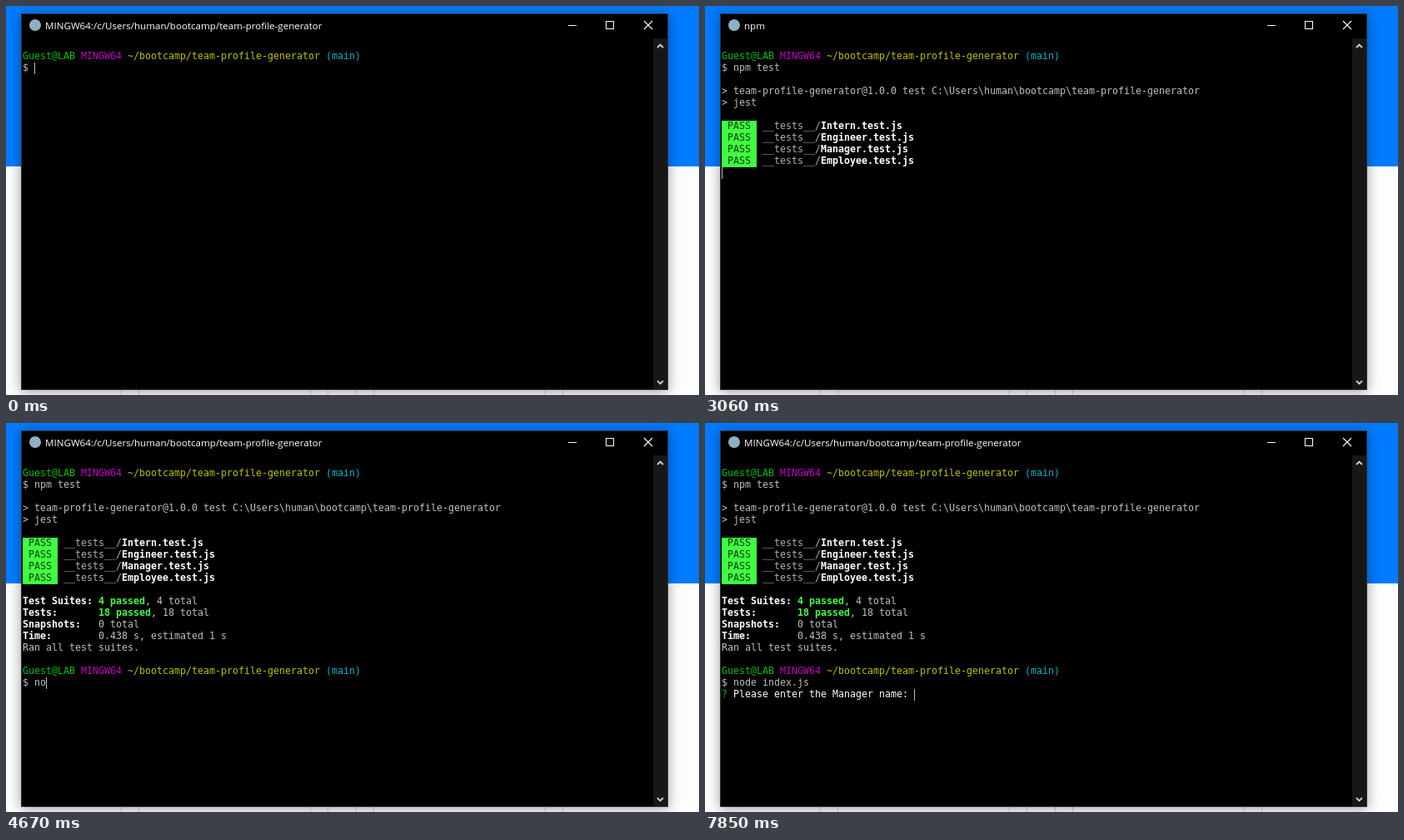
These frames come from a looping animation (832 px wide and 468 px high, 8000 ms). An HTML page with a canvas:

```html
<!DOCTYPE html>
<html lang="en">
<head>
<meta charset="utf-8">
<title>Terminal</title>
<style>
html, body { margin: 0; width: 100%; height: 100%; overflow: hidden; background: #fdfdfd; }
canvas { display: block; }
</style>
</head>
<body>
<canvas id="stage" width="832" height="468"></canvas>
<script>
const ctx = document.getElementById('stage').getContext('2d');
const LOOP = 8000;
const CELL = { w: 7, h: 14, left: 20, top: 40, baseline: 10 };
const MONO = '11.63px "DejaVu Sans Mono", monospace';
const C = {
  text: '#bfbfbf', white: '#ffffff', green: '#00bf00', magenta: '#bf00bf',
  yellow: '#bfbf00', cyan: '#00b4cc', lime: '#40ff40', amber: '#ffff40', dim: '#b0b0b0'
};
const PROJECT = 'team-profile-generator';
const SHELL_TITLE = `MINGW64:/c/Users/human/bootcamp/${PROJECT}`;

const seg = (text, color = C.text, bold = false, fill = null) => ({ text, color, bold, fill });

const prompt = [
  seg('Guest@LAB ', C.green), seg('MINGW64 ', C.magenta),
  seg(`~/bootcamp/${PROJECT} `, C.yellow), seg('(main)', C.cyan)
];
const testLine = (label, name, fill) => [
  seg(` ${label} `, '#123c12', false, fill), seg(' __tests__/', C.dim), seg(`${name}.test.js`, C.white, true)
];
const summary = (label, passed, rest) => [
  seg(label.padEnd(13), C.white, true), seg(passed, C.lime, true), seg(rest)
];

// Each entry: first visible time, row, segments, optional end time.
const lines = [
  [0, 1, prompt],
  [0, 2, [seg('$')]],
  [2200, 4, [seg(`> ${PROJECT}@1.0.0 test C:\\Users\\human\\bootcamp\\${PROJECT}`)]],
  [2200, 5, [seg('> jest')]],
  [2820, 8, testLine('RUNS', 'Intern', C.amber), 3060],
  ...['Intern', 'Engineer', 'Manager', 'Employee'].map(
    (name, i) => [3060, 7 + i, testLine('PASS', name, C.lime)]),
  [3180, 12, summary('Test Suites:', '4 passed', ', 4 total')],
  [3180, 13, summary('Tests:', '18 passed', ', 18 total')],
  [3180, 14, summary('Snapshots:', '', '0 total')],
  [3180, 15, summary('Time:', '', '0.438 s, estimated 1 s')],
  [3180, 16, [seg('Ran all test suites.')]],
  [3550, 18, prompt],
  [3550, 19, [seg('$')]],
  [6740, 20, [seg('? ', C.green), seg('Please enter the Manager name:', C.white)]]
];

const typed = [
  { row: 2, keys: [[500, 'n'], [620, 'p'], [860, 'm'], [980, ' '], [1100, 'te'], [1220, 's'], [1340, 't']] },
  { row: 19, keys: [[4670, 'no'], [4920, 'd'], [5160, 'e'], [5280, ' '], [5520, 'i'], [5640, 'nd'],
    [5760, 'e'], [6000, 'x'], [6120, '.j'], [6240, 's']] }
];

// Time, row, column; a lone time hides the cursor.
const cursorMoves = [
  [0, 2, 2], [250], [1580, 3, 0], [2200, 7, 0], [2700], [2820, 9, 0], [3060, 11, 0],
  [3180, 17, 0], [3550, 19, 2], [4050], [6490, 20, 0], [6740, 20, 33], [7230], [7850, 20, 33]
];
for (const { row, keys } of typed) {
  let col = 2;
  for (const [time, text] of keys) cursorMoves.push([time, row, col += text.length]);
}
cursorMoves.sort((a, b) => a[0] - b[0]);

function rect(x, y, w, h, color) {
  ctx.fillStyle = color;
  ctx.fillRect(x, y, w, h);
}

function path(points, color = C.white, width = 1) {
  ctx.beginPath();
  points.forEach(([x, y], i) => i ? ctx.lineTo(x, y) : ctx.moveTo(x, y));
  ctx.strokeStyle = color;
  ctx.lineWidth = width;
  ctx.stroke();
}

function drawPage() {
  rect(0, 0, 832, 468, '#fdfdfd');
  rect(0, 0, 832, 193, '#007bff');
  for (const x of [138, 159, 365, 386, 420, 441, 647, 668]) rect(x, 455, 1, 13, '#d6d6d6');
}

function drawWindow(title) {
  ctx.save();
  ctx.shadowColor = 'rgba(0,0,0,.38)';
  ctx.shadowBlur = 14;
  ctx.shadowOffsetY = 2;
  rect(18, 9, 777, 453, '#303030');
  ctx.restore();
  rect(19, 10, 775, 451, '#000000');

  ctx.fillStyle = '#8fb0c4';
  ctx.beginPath();
  ctx.arc(35, 23, 7, 0, Math.PI * 2);
  ctx.fill();

  ctx.font = '11.6px "Open Sans", sans-serif';
  ctx.fillStyle = C.white;
  ctx.fillText(title, 47, 28);

  rect(675, 23, 10, 1, C.white);
  ctx.strokeStyle = C.white;
  ctx.lineWidth = 1;
  ctx.strokeRect(720.5, 18.5, 9, 9);
  path([[766, 18], [776, 28]], C.white, 1.1);
  path([[776, 18], [766, 28]], C.white, 1.1);

  rect(777, 39, 17, 422, '#171717');
  path([[782, 50], [785.5, 46.5], [789, 50]], '#d0d0d0', 1.8);
  path([[782, 451], [785.5, 454.5], [789, 451]], '#d0d0d0', 1.8);
}

function drawText(row, col, { text, color, bold, fill }) {
  const x = CELL.left + col * CELL.w;
  const y = CELL.top + row * CELL.h;
  if (fill) rect(x, y, text.length * CELL.w, CELL.h, fill);
  ctx.font = (bold ? 'bold ' : '') + MONO;
  ctx.fillStyle = color;
  [...text].forEach((ch, i) => ctx.fillText(ch, x + i * CELL.w, y + CELL.baseline));
}

function drawTerminal(t) {
  for (const [from, row, segments, until = LOOP] of lines) {
    if (t < from || t >= until) continue;
    let col = 0;
    for (const s of segments) {
      drawText(row, col, s);
      col += s.text.length;
    }
  }
  for (const { row, keys } of typed) {
    const text = keys.filter(([time]) => t >= time).map(key => key[1]).join('');
    drawText(row, 2, seg(text));
  }
  const [, row, col] = cursorMoves.findLast(([time]) => t >= time);
  if (row !== undefined) {
    rect(CELL.left + col * CELL.w, CELL.top + row * CELL.h, 1, CELL.h, C.text);
  }
}

let start = null;
function frame(now) {
  start ??= now;
  const t = (now - start) % LOOP;
  drawPage();
  drawWindow(t >= 1830 && t < 3550 ? 'npm' : SHELL_TITLE);
  drawTerminal(t);
  requestAnimationFrame(frame);
}
requestAnimationFrame(frame);
</script>
</body>
</html>
```
